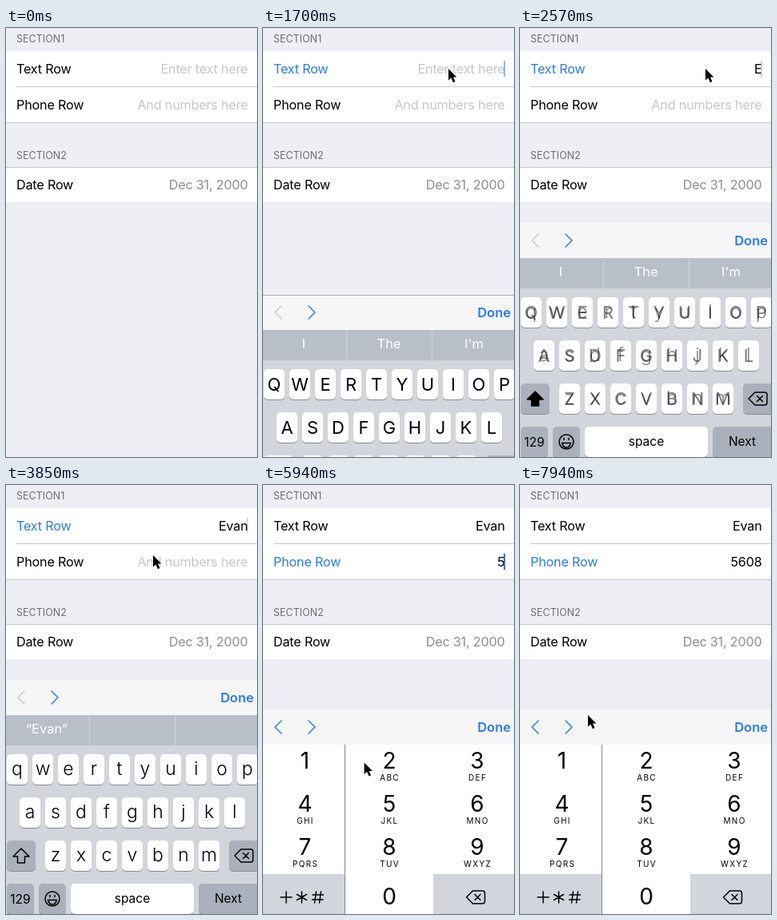
Animation of 314 by 537 pixels, one loop 8 s. Source, as an HTML page:

```html
<!DOCTYPE html>
<html lang="en">
<head>
<meta charset="utf-8">
<title>Form rows</title>
<style>
html, body { margin: 0; width: 100%; height: 100%; overflow: hidden; background: #efeef4; }
svg { display: block; width: 314px; height: 537px; font-family: Inter, Roboto, sans-serif; }
.row { font-size: 16.2px; letter-spacing: -.2px; }
.head { font-size: 12.4px; letter-spacing: .1px; fill: #6d6d72; }
.hint { fill: #c7c7cd; }
.end { text-anchor: end; }
.mid { text-anchor: middle; }
.done { font-size: 16.5px; font-weight: 600; fill: #2b7bf6; }
.word { font-size: 16.5px; fill: #fff; }
.upper { font-size: 22px; }
.lower { font-size: 23px; font-weight: 300; }
.label { font-size: 15.5px; }
.digit { font-size: 28px; }
.abc { font-size: 10px; letter-spacing: 1.3px; }
.line { fill: none; stroke: #000; stroke-width: 1.5; stroke-linejoin: round; stroke-linecap: round; }
.blue { stroke: #2b7bf6; }
</style>
</head>
<body>
<svg viewBox="0 0 314 537">
  <rect width="314" height="537" fill="#efeef4"/>
  <path d="M0 29H314V118H0zM0 175H314V218H0z" fill="#fff"/>
  <path d="M13 73H314V74H13zM0 118H314V119H0zM0 174H314V175H0z" fill="#c8c7cc"/>
  <text class="head" x="13" y="18">SECTION1</text>
  <text class="head" x="13" y="164">SECTION2</text>
  <g class="row">
    <text id="label1" x="13" y="57">Text Row</text>
    <text id="label2" x="13" y="102">Phone Row</text>
    <text x="13" y="202">Date Row</text>
    <text id="value1" class="end" x="302.5" y="57"></text>
    <text id="value2" class="end" x="302.5" y="102"></text>
    <text class="end" x="302.5" y="202" fill="#8e8e93">Dec 31, 2000</text>
  </g>
  <rect id="caret" x="301" width="2" height="20" fill="#3f68e0"/>
  <g id="panel">
    <rect width="314" height="300" fill="#d2d5db"/>
    <rect width="314" height="44" fill="#f6f6f8"/>
    <rect id="edge" width="314" height="1" fill="#a9a9ae"/>
    <path id="prev" class="line" d="M23 14L15 22L23 30"/>
    <path class="line blue" d="M57 14L65 22L57 30"/>
    <text class="done end" x="310" y="28">Done</text>
    <g id="keys"></g>
    <g id="pad"></g>
  </g>
  <path id="pointer" d="M0 0V14.6L3.4 11.5L5.9 17.2L8.5 16.1L6 10.5H10.4z" fill="#000" stroke="#fff" stroke-width="1" paint-order="stroke"/>
</svg>
<script>
const $ = id => document.getElementById(id);
const text = (cls, x, y, s, extra = '') => `<text class="${cls}" x="${x}" y="${y}" ${extra}>${s}</text>`;
const key = (x, y, w, fill = '#fff', id = '') =>
  `<rect x="${x}" y="${y + 1}" width="${w}" height="38" rx="5" fill="#898c91"/>` +
  `<rect id="${id}" x="${x}" y="${y}" width="${w}" height="38" rx="5" fill="${fill}"/>`;
const erase = (x, y) => `<path class="line" transform="translate(${x} ${y})"
  d="M8 0H20Q23 0 23 3V13Q23 16 20 16H8L0 8zM10.5 4.5L17.5 11.5M17.5 4.5L10.5 11.5"/>`;

function buildKeys() {
  const grey = '#abb1bc';
  let caps = '', upper = '', lower = '';
  [['QWERTYUIOP', 14], ['ASDFGHJKL', 30], ['ZXCVBNM', 62]].forEach(([row, left], r) => {
    [...row].forEach((c, i) => {
      const x = left + 32 * i, y = 93 + 54 * r;
      caps += key(x - 13, y, 26);
      upper += text('upper mid', x, y + 27, c);
      lower += text('lower mid', x, y + 26, c.toLowerCase());
    });
  });
  $('keys').innerHTML =
    `<rect y="44" width="314" height="38" fill="#b9bfc8"/>
     <path d="M104 44H105V82H104zM211 44H212V82H211z" fill="#d0d4da"/>
     <g id="hints">${['I', 'The', "I'm"].map((s, i) => text('word mid', 51 + 106.5 * i, 67, s)).join('')}</g>` +
    text('word mid', 51, 67, '“Evan”', 'id="guess"') + caps +
    key(1, 201, 36, grey, 'shiftKey') + key(279, 201, 40, grey) +
    key(1, 255, 34, grey) + key(41, 255, 34, grey) + key(81, 255, 154) + key(241, 255, 80, grey) +
    `<path id="shift" class="line" d="M19 211L29 221H23.5V229H14.5V221H9z"/>` + erase(286, 212) +
    `<g class="line"><circle cx="58" cy="274" r="9"/><path d="M52.5 275.5H63.5Q62 281 58 281T52.5 275.5zM55 269.5V271.5M61 269.5V271.5"/></g>` +
    text('label mid', 18, 280, '129') + text('label mid', 158, 279, 'space') + text('label mid', 278, 279, 'Next') +
    `<g id="upper">${upper}</g><g id="lower">${lower}</g>`;
}

const colX = [0, 103, 213], colW = [102, 110, 101], colMid = [52.5, 158, 268];

function buildPad() {
  const names = ['', 'ABC', 'DEF', 'GHI', 'JKL', 'MNO', 'PQRS', 'TUV', 'WXYZ'];
  let s = `<rect y="44" width="314" height="256" fill="#fff"/>
    <path d="M0 206H102V300H0zM213 206H314V300H213z" fill="#d2d5db"/>
    <rect id="press" height="54" fill="#d2d5db"/>
    <rect x="102" y="44" width="1" height="256" fill="#85868a"/>`;
  names.forEach((name, i) => {
    const x = colMid[i % 3], y = 54 * Math.floor(i / 3);
    s += text('digit mid', x, y + 74, i + 1) + text('abc mid', x + .6, y + 89, name);
  });
  $('pad').innerHTML = s + text('digit mid', 158, 244, 0) + erase(254.5, 227) +
    `<path class="line" d="M22 235H36M29 228V242M48.500 228V242M42.500 231.500L54.500 238.500M54.500 231.500L42.500 238.500
      M62 232H75.500M61.500 238H75M66.500 228L64.500 242M72.500 228L70.500 242"/>`;
}

// Piecewise linear track of [time, ...values]
function track(points, t) {
  let i = 0;
  while (i < points.length - 2 && t >= points[i + 1][0]) i++;
  const [a, b] = [points[i], points[i + 1]];
  const k = Math.min(1, Math.max(0, (t - a[0]) / (b[0] - a[0])));
  return a.slice(1).map((v, j) => v + (b[j + 1] - v) * k);
}

const route = [
  [540, 303, 147], [900, 241, 101], [1080, 218, 74], [1290, 230, 58], [1350, 232, 51],
  [3730, 232, 51], [3850, 184, 88], [4200, 94, 205], [4480, 56, 258], [4600, 57, 260], [4660, 58, 262],
  [4960, 58, 262], [5140, 67, 274], [5400, 73, 335], [5680, 74, 341], [5760, 78, 342],
  [5960, 132, 348], [6120, 134, 349], [6320, 226, 353], [6560, 228, 355],
  [6620, 206, 362], [6740, 102, 381], [6860, 64, 399], [7080, 60, 403], [7260, 60, 403],
  [7500, 64, 382], [7920, 85, 288]
];
const blink = [
  [1580, .25], [1700, .5], [1800, 1], [2080, 1], [2240, .3], [2570, .3], [2690, 1], [3200, 1],
  [3310, .25], [3850, .25], [3970, 1], [4330, 1], [4450, 0], [4840, 0], [4900, 1],
  [7740, 1], [7860, 0]
];
const presses = [[5480, 5620, 0], [6010, 6130, 1], [6380, 6620, 2], [7080, 7260, 3]];
const nameTimes = [2570, 2810, 3050, 3270], digitTimes = [5620, 6130, 6560, 7260];
const typed = (s, times, t) => s.slice(0, times.filter(x => t >= x).length);
const bursts = [0, 540, 1350, 1580, 2570, 3380, 3730, 4600, 4900, 5760, 6620, 7260];

function sample(t) {
  const start = bursts.filter(b => b <= t).pop();
  return start + Math.floor((t - start) / 60) * 60;
}

function panelTop(t) {
  if (t < 1580) return 540;
  if (t < 2280) return Math.round(244 + 293 * Math.exp((1520 - t) / 152));
  if (t < 4900) return 244;
  return Math.round(281 - 37 * Math.exp((4860 - t) / 60));
}

function field(id, value, hint) {
  $(id).textContent = value || hint;
  $(id).setAttribute('class', value ? 'end' : 'end hint');
}

function draw(now) {
  const t = sample(now), phone = t >= 4900, active = t >= 1580;
  const ramp = (a, b) => track([[a, 0], [b, 1]], t)[0];

  $('label1').setAttribute('fill', active && !phone ? '#2b7bf6' : '#000');
  $('label2').setAttribute('fill', phone ? '#2b7bf6' : '#000');
  field('value1', typed('Evan', nameTimes, t), 'Enter text here');
  field('value2', typed('5608', digitTimes, t), 'And numbers here');

  $('caret').setAttribute('y', phone ? 86 : 41);
  $('caret').setAttribute('opacity', active ? track(blink, t)[0] : 0);

  $('panel').setAttribute('transform', `translate(0 ${panelTop(t)})`);
  $('edge').setAttribute('opacity', t < 2280 ? 1 : 0);
  $('prev').style.stroke = phone ? '#2b7bf6' : '#c7c7cc';

  const low = ramp(2510, 2630);
  $('upper').setAttribute('opacity', 1 - low);
  $('lower').setAttribute('opacity', low);
  $('shiftKey').setAttribute('fill', t < 2570 ? '#fff' : '#abb1bc');
  $('shift').style.fill = t < 2630 ? '#000' : 'none';
  $('hints').setAttribute('opacity', 1 - ramp(2630, 2750));
  $('guess').setAttribute('opacity', ramp(3320, 3500));

  $('pad').setAttribute('opacity', ramp(4860, 5080));
  const hit = presses.find(([a, b]) => t >= a && t < b);
  $('press').setAttribute('visibility', hit ? 'visible' : 'hidden');
  if (hit) {
    const col = hit[2] % 3;
    $('press').setAttribute('x', colX[col]);
    $('press').setAttribute('width', colW[col]);
    $('press').setAttribute('y', 44 + 54 * Math.floor(hit[2] / 3));
  }

  const [x, y] = track(route, t);
  $('pointer').setAttribute('transform', `translate(${x} ${y})`);
  $('pointer').setAttribute('visibility', t < 540 ? 'hidden' : 'visible');
}

buildKeys();
buildPad();
const began = performance.now();
function tick() {
  draw((performance.now() - began) % 8000);
  requestAnimationFrame(tick);
}
tick();
</script>
</body>
</html>
```
